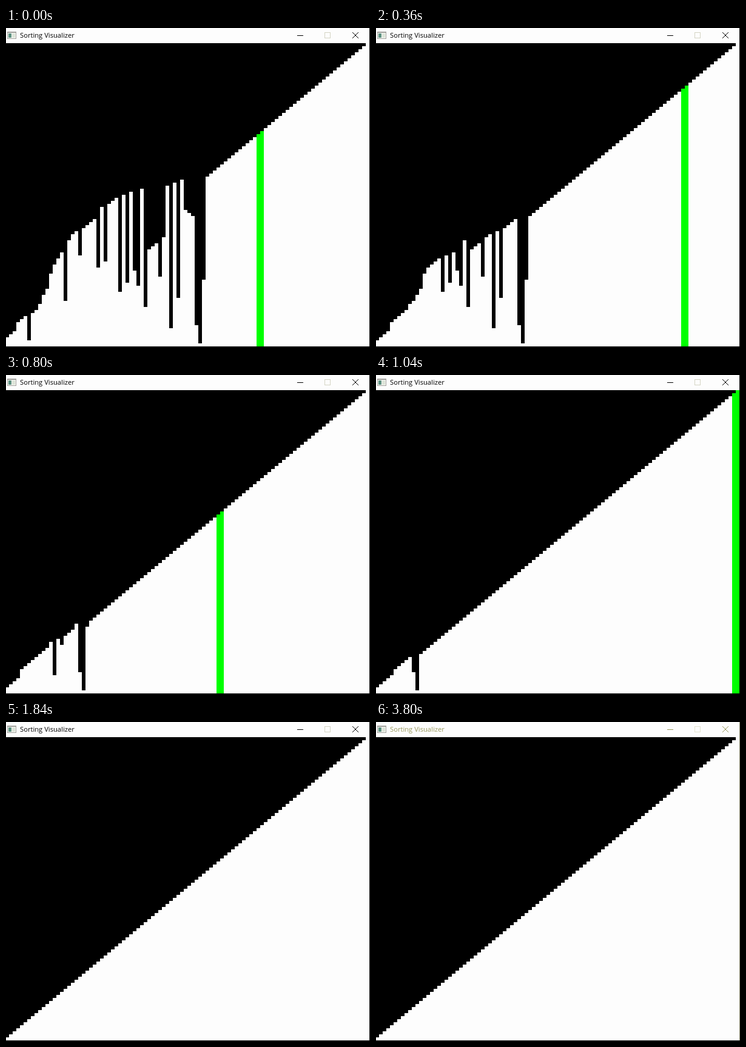
An HTML page with a canvas for the animation above (3.88 s loop, 600x526 px).

```html
<!DOCTYPE html>
<html>
<head>
<meta charset="utf-8">
<title>Sorting Visualizer</title>
<style>
  html, body { margin: 0; width: 100%; height: 100%; overflow: hidden; background: #000; }
  canvas { display: block; }
</style>
</head>
<body>
<canvas id="stage" width="600" height="526"></canvas>
<script>
const ctx = document.getElementById('stage').getContext('2d');
const LOOP = 3880, STEP = 40, COUNT = 100, PASS = COUNT - 1;
const SORTED = 1320, UNFOCUSED = 3720;
const WHITE = '#fdfdfd', GREEN = '#00ff00';

// Pace of the sort: [time, comparisons made], linear in between.
// Each is full passes plus the place reached in the current one.
const pace = [
  [STEP, 69],
  [360, 13 * PASS + 84],
  [800, 32 * PASS + 58],
  [1040, 42 * PASS + 98],
  [SORTED, 55 * PASS]
];

// A half-sorted list: short bars still on their way left, the rest rising.
function makeBars() {
  const bars = Array(COUNT);
  for (let i = 25; i <= 27; i += 2) bars[i] = i + 1;
  for (let i = 39; i <= 43; i++) bars[i] = i - 7;
  for (let i = 49; i <= 51; i++) bars[i] = 94 - i;
  Object.assign(bars, {
    6: 2, 16: 15, 20: 30, 31: 18, 33: 21, 35: 25, 36: 20,
    38: 13, 42: 23, 45: 6, 47: 16, 52: 7, 53: 1, 54: 22
  });
  const placed = new Set(bars);
  let next = 1;
  for (let i = 0; i < COUNT; i++) {
    if (bars[i]) continue;
    while (placed.has(next)) next++;
    bars[i] = next++;
  }
  return bars;
}

const start = makeBars();

function comparisonsAt(t) {
  t = Math.min(SORTED, Math.max(STEP, Math.floor(t / STEP) * STEP));
  const k = pace.findIndex(([end], i) => i > 0 && t <= end);
  const [t0, c0] = pace[k - 1], [t1, c1] = pace[k];
  return Math.round(c0 + (c1 - c0) * (t - t0) / (t1 - t0));
}

// Bubble sort, full passes, up to the given comparison.
function barsAfter(comparisons) {
  const bars = start.slice();
  for (let c = pace[0][1] + 1; c <= comparisons; c++) {
    const j = c % PASS;
    if (bars[j] > bars[j + 1]) [bars[j], bars[j + 1]] = [bars[j + 1], bars[j]];
  }
  return bars;
}

function rect(color, x, y, w, h) {
  ctx.fillStyle = color;
  ctx.fillRect(x, y, w, h);
}

function drawTitleBar(focused) {
  const ink = focused ? '#000' : '#98985c';
  rect(WHITE, 0, 0, 600, 25);

  // window icon
  rect('#a0a09c', 2, 6, 15, 12);
  rect('#f8f8f4', 3, 8, 13, 9);
  rect('#5c9080', 4, 9, 5, 7);
  rect('#dce4d8', 10, 9, 5, 7);

  ctx.fillStyle = ink;
  ctx.font = '11.2px "Open Sans", "Noto Sans", sans-serif';
  ctx.fillText('Sorting Visualizer', 23, 16);

  rect(ink, 480, 12, 10, 1);
  ctx.lineWidth = 1;
  ctx.strokeStyle = focused ? '#d4d4c4' : '#e4e4d0';
  ctx.strokeRect(525.5, 7.5, 9, 9);
  ctx.strokeStyle = ink;
  ctx.stroke(new Path2D('M571 7l10 10m0-10l-10 10'));
}

function draw(t) {
  const done = comparisonsAt(t);
  const active = t < SORTED ? done % PASS : -2;
  const focused = t < UNFOCUSED;

  rect('#000', 0, 0, 600, 526);
  barsAfter(done).forEach((v, i) => {
    const color = i === active || i === active + 1 ? GREEN : WHITE;
    rect(color, i * 6 - 1, 525 - v * 5, 6, v * 5);
  });
  drawTitleBar(focused);
  rect(focused ? '#000' : '#88886c', 599, 0, 1, 525);
}

function tick() {
  draw(performance.now() % LOOP);
  requestAnimationFrame(tick);
}
tick();
</script>
</body>
</html>
```
